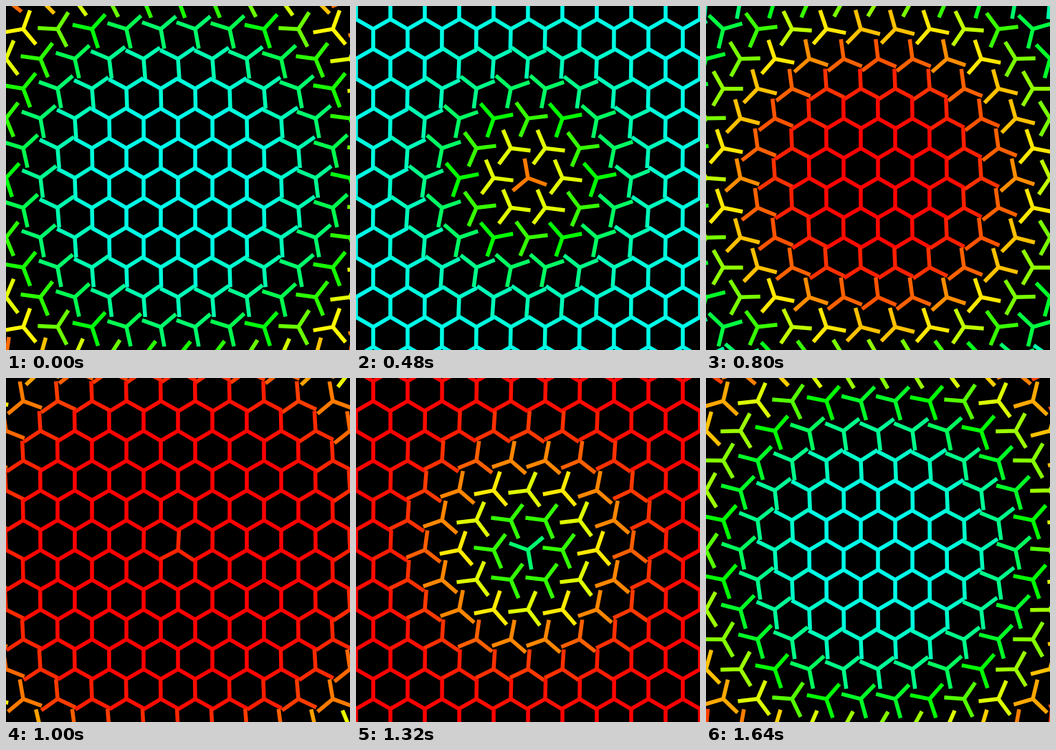
Animation, 480 px wide and 480 px high, one loop 1680 ms. Source, as an HTML page with a canvas:

```html
<!DOCTYPE html>
<html>
<head>
<meta charset="utf-8">
<style>
  html, body { margin: 0; width: 100%; height: 100%; overflow: hidden; background: #000; }
  canvas { display: block; }
</style>
</head>
<body>
<canvas id="stage" width="480" height="480"></canvas>
<script>
const ctx = document.getElementById('stage').getContext('2d');
const SIZE = 480, CENTER = SIZE / 2;
const LOOP = 1680, STEP = 40, TURN = LOOP / 2;
const SPACING = 48, ROW = SPACING * Math.sqrt(3) / 2, ARM = SPACING / Math.sqrt(3);
const WAVELENGTH = 485, PHASE = 0.0643, EASE_POWER = 3.5, MAX_HUE = 175;

const ease = p => p < 0.5
  ? 0.5 * Math.pow(2 * p, EASE_POWER)
  : 1 - 0.5 * Math.pow(2 * (1 - p), EASE_POWER);

const nodes = [];
for (let row = -7; row <= 7; row++) {
  const shift = row % 2 ? SPACING / 2 : 0;
  for (let col = -7; col <= 6; col++) {
    const x = col * SPACING + shift, y = row * ROW;
    nodes.push({ x: CENTER + x, y: CENTER + y, delay: Math.hypot(x, y) / WAVELENGTH });
  }
}

function drawNode({ x, y, delay }, time) {
  const progress = time / TURN + PHASE - delay;
  const turn = Math.floor(progress);
  const e = ease(progress - turn);
  const rotation = (turn + e) * Math.PI / 3;
  ctx.strokeStyle = `hsl(${MAX_HUE * (turn % 2 ? e : 1 - e)}, 100%, 50%)`;
  ctx.beginPath();
  for (let arm = 0; arm < 3; arm++) {
    const angle = Math.PI / 2 + rotation + arm * Math.PI * 2 / 3;
    ctx.moveTo(x, y);
    ctx.lineTo(x + ARM * Math.cos(angle), y + ARM * Math.sin(angle));
  }
  ctx.stroke();
}

function render(now) {
  const time = Math.floor((now % LOOP) / STEP) * STEP;
  ctx.fillStyle = '#000';
  ctx.fillRect(0, 0, SIZE, SIZE);
  ctx.lineWidth = 5.5;
  for (const node of nodes) drawNode(node, time);
}

let start;
function tick(now) {
  start ??= now;
  render(now - start);
  requestAnimationFrame(tick);
}
render(0);
requestAnimationFrame(tick);
</script>
</body>
</html>
```
